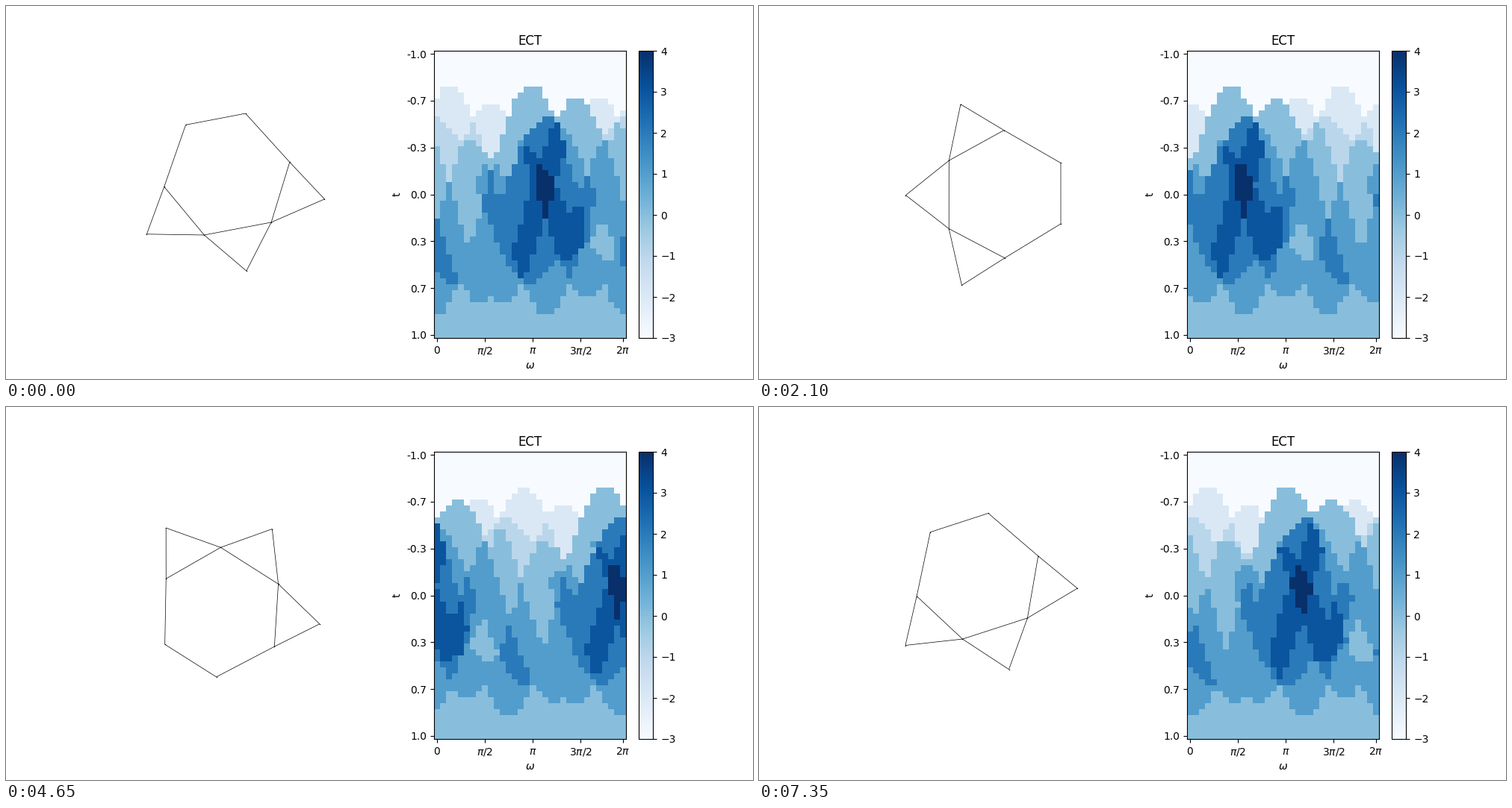
Write a matplotlib script that moves like this. It is 1000 by 500 pixels and loops after 7500 ms.

```python
import numpy as np
import matplotlib.pyplot as plt
from matplotlib.animation import FuncAnimation
from matplotlib.collections import LineCollection

FRAMES, INTERVAL = 50, 150
N_DIR, N_LEVEL = 32, 48

# Vertices A..I as radius and angle in degrees
RADIUS = np.array([.7254, .7195, .5857, .8188, .4290, .6836, .4257, .5876, .8142])
ANGLE = np.radians([123.05, 79.8, 28.8, -2.9, -34.75, 281.4, 236.7, 173.5, 205.3])


def pairs(text):
    return np.array([["ABCDEFGHI".index(c) for c in p] for p in text.split()])


# The drawn graph and the transform number the vertices differently
DRAWN = pairs("AB BC CD DE CE EF FG EG GH GI HI HA")
EDGES = pairs("GH HE EF ED FD DA AB DB BC BI CI GC")

THETA = np.arange(N_DIR) * 2 * np.pi / N_DIR
DIRS = np.array([np.cos(THETA), np.sin(THETA)])


def vertices(frame):
    a = ANGLE - 2 * np.pi * frame / FRAMES
    return np.column_stack([RADIUS * np.cos(a), RADIUS * np.sin(a)])


def euler_transform(pts):
    """Vertices minus edges at or above each level, per direction."""
    top = np.ceil((pts @ DIRS + 1) * (N_LEVEL - 1) / 2)
    edge_top = top[EDGES].min(axis=1)
    level = np.arange(N_LEVEL)[:, None, None]
    return (level <= top).sum(axis=1) - (level <= edge_top).sum(axis=1)


fig, (ax, ect_ax) = plt.subplots(1, 2, figsize=(10, 5), dpi=100)

ax.set(xlim=(-1.15, 1.15), ylim=(-1.15, 1.15), aspect="equal")
ax.axis("off")
start = vertices(0)
lines = LineCollection(start[DRAWN], colors="black", linewidths=0.5)
ax.add_collection(lines)
dots = ax.scatter(*start.T, s=1, c="black", linewidths=0, zorder=3)

image = ect_ax.imshow(euler_transform(start), cmap="Blues", vmin=-3, vmax=4)
fig.colorbar(image, ax=ect_ax)
ect_ax.set_title("ECT")
ect_ax.set_xlabel(r"$\omega$")
ect_ax.set_ylabel("t")
ect_ax.set_xticks([0, 8, 16, 24, 31],
                  ["0", r"$\pi/2$", r"$\pi$", r"$3\pi/2$", r"$2\pi$"])
ect_ax.set_yticks(np.linspace(0, N_LEVEL - 1, 7),
                  [f"{t:.1f}" for t in np.linspace(-1, 1, 7)])


def update(frame):
    pts = vertices(frame)
    lines.set_segments(pts[DRAWN])
    dots.set_offsets(pts)
    image.set_data(euler_transform(pts))
    return lines, dots, image


anim = FuncAnimation(fig, update, frames=FRAMES, interval=INTERVAL,
                     repeat=True, repeat_delay=0, blit=False)
plt.show()
```
